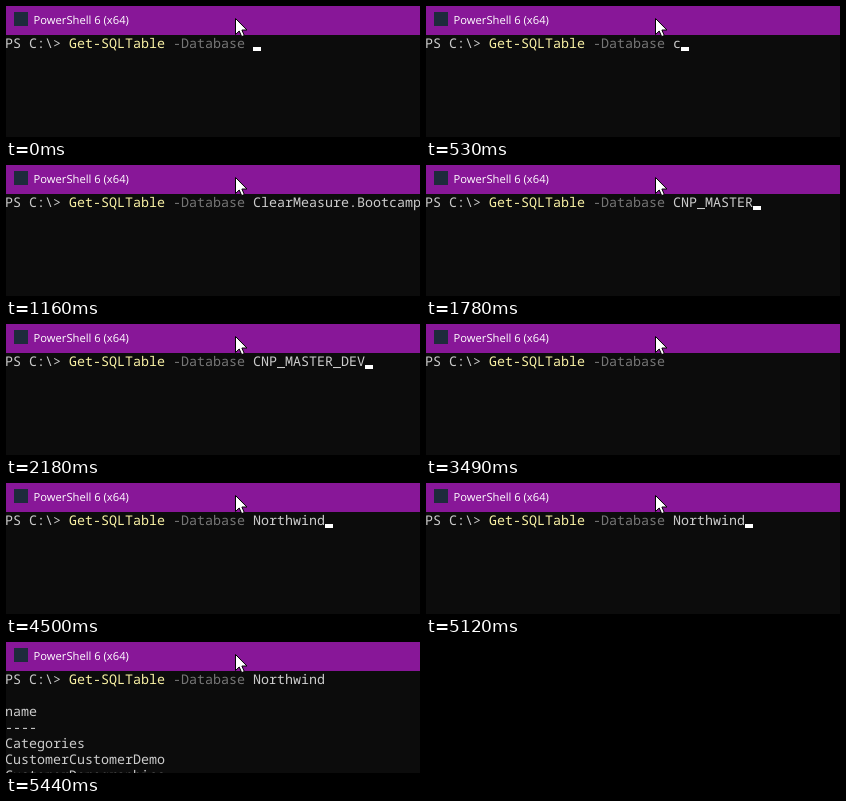
An HTML page that plays this animation: 414 px wide and 131 px high, repeating every 6690 ms.

```html
<!DOCTYPE html>
<html lang="en">
<head>
<meta charset="utf-8">
<title>Console tab completion</title>
<style>
  html, body { margin: 0; width: 100%; height: 100%; overflow: hidden; background: #0c0c0c; }
  svg { display: block; width: 414px; height: 131px; }
  text { white-space: pre; text-rendering: geometricPrecision; }
  .title { font: 11.2px "Open Sans", "Noto Sans", sans-serif; fill: #fff; }
  .term { font: 13.3333px "Noto Sans Mono", "DejaVu Sans Mono", monospace; fill: #ccc; }
  .cmd { fill: #f9f1a5; }
  .param { fill: #767676; }
</style>
</head>
<body>
<svg viewBox="0 0 414 131">
  <rect width="414" height="131" fill="#0c0c0c"/>
  <rect width="414" height="29" fill="#881798"/>
  <rect x="8" y="6" width="14" height="14" fill="#1e2b3c"/>
  <text class="title" x="27.6" y="18">PowerShell 6 (x64)</text>
  <g class="term">
    <text x="-1" y="42">PS C:\&gt;</text>
    <text class="cmd" x="63" y="42">Get-SQLTable</text>
    <text class="param" x="167" y="42">-Database</text>
    <text id="arg" x="247" y="42"></text>
    <g id="output"></g>
  </g>
  <rect id="caret" width="8" height="4" fill="#fff"/>
  <path d="M229.5 12.5v16l3.7-3.5 2.5 5.6 2.6-1.1-2.4-5.5h5z" fill="#fff" stroke="#000" stroke-width="1"/>
</svg>
<script>
const LOOP = 6690, CELL = 8, LINE = 16, LEFT = -1, ARG_COL = 31;
const $ = id => document.getElementById(id);
const arg = $('arg'), output = $('output'), caret = $('caret');

// Start time, argument text, caret: 1 after text, 0 hidden, 'next' on the next line
const steps = [
  [0, '', 1],
  [460, 'c', 0],
  [530, 'c', 1],
  [1020, 'c', 0],
  [1160, 'ClearMeasure.Bootcamp', 1],
  [1480, 'ClearMeasure.Identity', 1],
  [1780, 'CNP_MASTER', 1],
  [2010, 'CNP_MASTER', 0],
  [2180, 'CNP_MASTER_DEV', 1],
  [2560, 'CNP_TXDEMO', 1],
  [3110, 'CNP_TXDEMO', 0],
  [3260, '', 1],
  [3490, '', 0],
  [3950, 'n', 0],
  [4020, 'n', 1],
  [4500, 'Northwind', 1],
  [4570, 'Northwind', 0],
  [5120, 'Northwind', 1],
  [5360, 'Northwind', 'next'],
  [5440, 'Northwind', 0, true]
];

['name', '----', 'Categories', 'CustomerCustomerDemo', 'CustomerDemographics'].forEach((row, i) => {
  const line = document.createElementNS('http://www.w3.org/2000/svg', 'text');
  line.setAttribute('x', LEFT);
  line.setAttribute('y', 42 + LINE * (i + 2));
  line.textContent = row;
  output.append(line);
});

let shown = null;

function show(step) {
  if (step === shown) return;
  shown = step;
  const [, text, mode, done] = step;
  const next = mode === 'next';
  arg.textContent = text;
  caret.setAttribute('x', LEFT + CELL * (next ? 0 : ARG_COL + text.length));
  caret.setAttribute('y', next ? 41 + LINE : 41);
  caret.style.display = mode ? '' : 'none';
  output.style.display = done ? '' : 'none';
}

const start = performance.now();

function tick(now) {
  const t = Math.max(0, now - start) % LOOP;
  show(steps.findLast(s => s[0] <= t));
  requestAnimationFrame(tick);
}

show(steps[0]);
requestAnimationFrame(tick);
</script>
</body>
</html>
```
